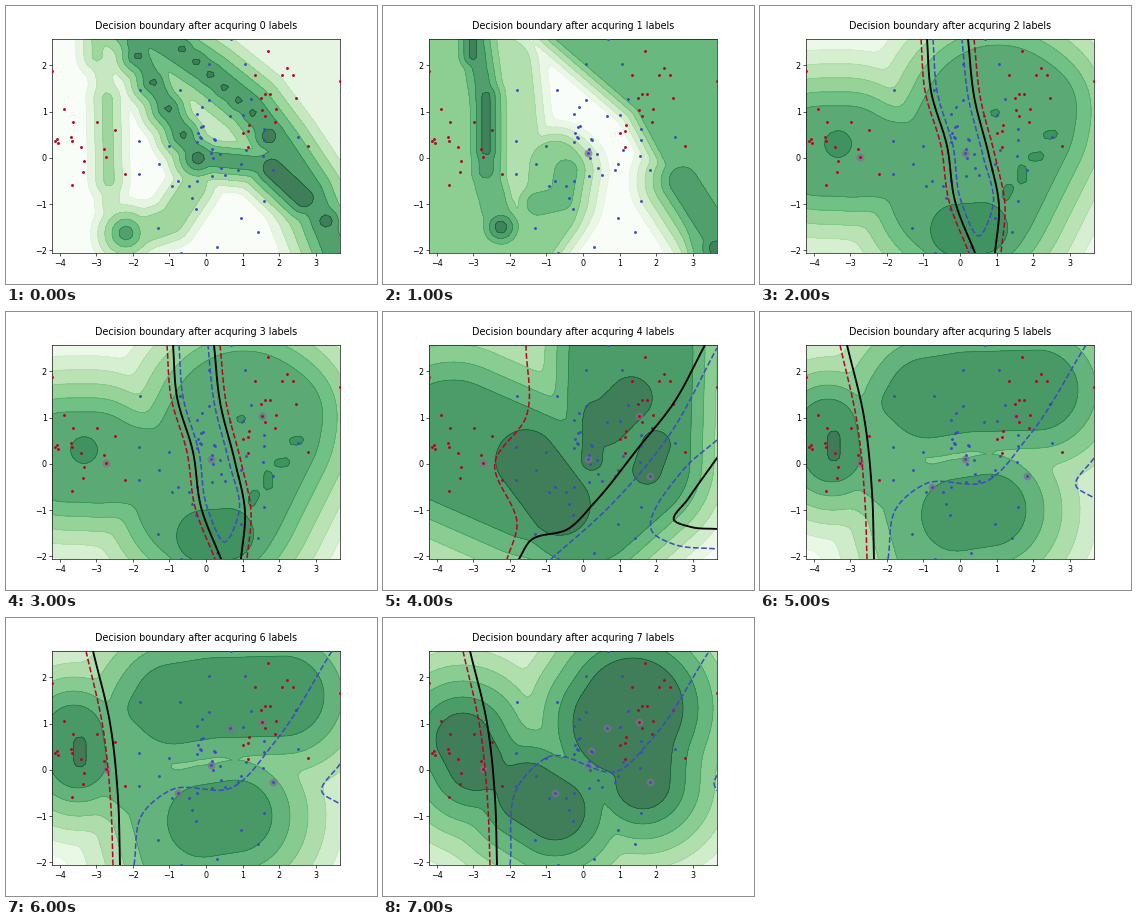
A matplotlib script for the animation above (8000 ms loop, 371 by 278 pixels).

```python
import numpy as np
import matplotlib.pyplot as plt
from matplotlib.animation import ArtistAnimation

W, H, DPI = 371, 278, 58
RED, BLUE, BLACK = "#b40426", "#3b4cc0", "black"
LEFT, RIGHT, TOP, BOTTOM = 46.375, 333.9, 33.36, 247.42
GREENS = plt.get_cmap("Greens")

fig, ax = plt.subplots(figsize=((W + .01) / DPI, (H + .01) / DPI), dpi=DPI)

# Plot coordinates are stage pixels; the ticks carry the data units.
ax.set(xlim=(LEFT, RIGHT), ylim=(BOTTOM, TOP))
ax.set_autoscale_on(False)
xs, ys = np.arange(-4, 4), np.arange(-2, 3)
ax.set_xticks(200.03 + 36.55 * xs, [f"{v}".replace("-", "\u2212") for v in xs])
ax.set_yticks(151.9 - 46.25 * ys, [f"{v}".replace("-", "\u2212") for v in ys])

X, Y = np.meshgrid(np.linspace(LEFT, RIGHT, 60), np.linspace(TOP, BOTTOM, 60))
scenes = [[] for _ in range(8)]


def distance(path):
    """Distance of every grid point to a path of straight pieces."""
    best = np.full(X.shape, np.inf)
    for (ax0, ay0), (bx, by) in zip(path, path[1:] or path):
        dx, dy = bx - ax0, by - ay0
        u = ((X - ax0) * dx + (Y - ay0) * dy) / max(dx * dx + dy * dy, 1e-9)
        u = np.clip(u, 0, 1)
        best = np.minimum(best, np.hypot(X - ax0 - u * dx, Y - ay0 - u * dy))
    return best


def hill(level, reach, fall, *path):
    """Plateau within `reach` of the path, losing one level per `fall` pixels."""
    return level + np.minimum(.4, (reach - distance(path)) / fall)


def terrain(steps, bands, peak, hills):
    """Merge hills smoothly and draw them as green contour bands."""
    z = np.log(sum(np.exp(4 * h) for h in hills)) / 4
    z = np.clip(z, .01, bands - .01)
    tones = GREENS(peak * np.linspace(0, 1, bands))[:, :3]
    fill = ax.contourf(X, Y, z, np.arange(bands + 1), colors=.75 * tones + .25, zorder=1)
    edge = ax.contour(X, Y, z, np.arange(1, bands), colors=tones[1:], linewidths=.7, zorder=1)
    for s in steps:
        scenes[s] += [fill, edge]


def curve(knots, n=16):
    """Cubic Hermite curve through the knots."""
    p = np.array(knots, float)
    t = np.r_[0, np.cumsum(np.hypot(*np.diff(p, axis=0).T))]
    m = np.gradient(p, t, axis=0)
    u = np.linspace(0, 1, n)[:, None]
    out = []
    for i, h in enumerate(np.diff(t)):
        out.append((1 + 2 * u) * (1 - u) ** 2 * p[i] + u * (1 - u) ** 2 * h * m[i]
                   + u * u * (3 - 2 * u) * p[i + 1] + u * u * (u - 1) * h * m[i + 1])
    return np.vstack(out).T


def line(steps, color, *knots):
    style, width = ("-", 2.3) if color == BLACK else ("--", 1.9)
    artist, = ax.plot(*curve(knots), style, color=color, lw=width, zorder=4)
    for s in steps:
        scenes[s].append(artist)


def row(a, b, n):
    return zip(np.linspace(a[0], b[0], n), np.linspace(a[1], b[1], n))


# No labels: a dark crescent with a chain of peaks on both arms
chains = [*row((132, 50), (177, 129), 4), *row((176, 43), (247, 107), 6)]
terrain([0], 7, .95, [
    hill(1, 110, 20, (310, 50)),
    hill(5, 11, 10, (120, 15), (160, 38), (205, 68), (245, 100), (275, 140), (305, 185), (328, 245)),
    hill(5, 7, 6, (128, 36), (150, 80), (176, 128), (192, 152), (255, 158), (285, 175)),
    hill(3, 5, 8, (101, 92), (103, 175)),
    hill(3, 5, 8, (91, 20), (91, 50)),
    hill(2, 8, 8, (91, 30), (103, 100), (105, 200), (118, 228)),
    hill(3, 12, 8, (115, 232), (165, 215), (188, 180)),
    hill(5, 7, 7, (120, 227)),
    hill(6, 9, 6, (266, 162), (298, 192)),
    hill(6, 7, 6, (263, 130)),
    hill(6, 6, 6, (192, 152)),
    hill(6, 6, 6, (320, 215)),
    *(hill(6, 3.5, 6, p) for p in chains)])

# One label: a pale wedge between two plateaus
terrain([1], 8, .93, [
    hill(5, 68, 5.5, (215, -20), (308, 60), (356, 150), (385, 260)),
    hill(4, 62, 10, (50, 0), (50, 280)),
    hill(3, 28, 8, (120, 60), (132, 180)),
    hill(4, 25, 7, (140, 245), (168, 205), (172, 160)),
    hill(5, 11, 8, (183, 165), (178, 193), (155, 198)),
    hill(5, 13, 6, (90, 20), (103, 110), (103, 170), (117, 222)),
    hill(6, 7, 6, (90, 20), (103, 100), (103, 165)),
    hill(6, 10, 6, (118, 221)),
    hill(7, 4, 5, (90, 20), (90, 50)),
    hill(7, 4, 5, (103, 90), (103, 145)),
    hill(7, 6, 5, (118, 221)),
    hill(6, 14, 8, (300, 175), (345, 245)),
    hill(7, 7, 6, (333, 242))])

# Two and three labels: a broad plateau cut by a narrow vertical band
early = [2, 3]
terrain(early, 8, .87, [
    hill(6, 45, 14, (60, 145), (88, 145)),
    hill(6, 38, 14, (100, 150), (160, 158)),
    hill(6, 76, 15, (238, 115), (205, 180)),
    hill(6, 40, 14, (275, 100), (225, 215)),
    hill(7, 25, 10, (196, 224), (222, 222)),
    hill(7, 13, 6, (78, 138)),
    hill(7, 4, 5, (235, 107)),
    hill(7, 4, 5, (288, 129), (293, 128)),
    hill(7, 4, 5, (273, 151), (280, 150)),
    hill(7, 4, 5, (262, 163), (262, 174)),
    hill(7, 4, 5, (249, 182), (246, 190))])
west = np.array([(167, 33), (171, 85), (187, 140), (195, 195), (215, 247)])
east = np.array([(208, 33), (214, 90), (229, 150), (239, 200), (235, 247)])
for color, gap in ((RED, 6), (BLACK, 0)):
    line(early, color, *(west - [gap, 0]))
    line(early, color, *(east + [gap, 0]))
line(early, BLUE, *(west[:-1] + [6, 0]), (219, 230), *(east[-2::-1] - [6, 0]))

# Four labels
terrain([4], 8, .95, [
    hill(6, 62, 18, (70, 130), (150, 165)),
    hill(6, 62, 12, (248, 40), (245, 150), (200, 190)),
    hill(7, 30, 10, (143, 148), (177, 193)),
    hill(7, 21, 8, (222, 112), (248, 86)),
    hill(7, 10, 8, (212, 100), (209, 148)),
    hill(7, 14, 8, (273, 133), (264, 158))])
line([4], RED, (143, 33), (143, 105), (112, 150), (134, 215), (124, 247))
line([4], BLUE, (168, 247), (225, 196), (285, 125), (334, 36))
line([4], BLUE, (334, 128), (300, 158), (271, 222), (290, 232), (334, 237))
line([4], BLACK, (136, 247), (147, 229), (185, 217), (212, 190), (256, 135), (290, 92), (322, 33))
line([4], BLACK, (334, 146), (305, 187), (291, 208), (308, 215), (334, 217))

# Five and six labels
late = [5, 6]
terrain(late, 8, .97, [
    hill(6, 28, 14, (68, 115), (72, 142)),
    hill(7, 6, 7, (74, 125), (74, 143)),
    hill(6, 40, 18, (168, 86), (205, 80), (278, 78)),
    hill(6, 12, 18, (135, 91), (165, 86)),
    hill(6, 36, 18, (198, 203), (230, 198)),
    hill(5, 30, 18, (105, 140), (150, 180), (165, 235))])
line(late, BLUE, (128, 247), (137, 195), (165, 172), (225, 170), (268, 125), (326, 33))
line(late, BLUE, (334, 146), (316, 174), (334, 186))

# Seven labels
terrain([7], 8, .95, [
    hill(7, 27, 16, (80, 122), (92, 145)),
    hill(7, 10, 16, (100, 155), (130, 163)),
    hill(7, 30, 16, (145, 175), (172, 192)),
    hill(7, 50, 15, (250, 90), (240, 105)),
    hill(7, 27, 15, (262, 120), (260, 164))])
line([7], BLUE, (127, 247), (137, 165), (165, 139), (235, 153), (268, 122), (325, 35))
line([7], BLUE, (334, 157), (331, 165), (334, 173))

line([5, 6, 7], RED, (80, 33), (97, 110), (105, 190), (107, 247))
line([5, 6, 7], BLACK, (87, 33), (104, 105), (112, 180), (114, 247))

# Samples: a few key points per class, the rest scattered around cluster centres
rng = np.random.default_rng(4)


def cluster(n, centre, spread):
    return np.clip(rng.normal(size=(n, 2)), -1.8, 1.8) * spread + centre


queries = np.array([(205, 147), (100, 151), (256, 104), (267, 164),
                    (172, 175), (224, 110), (208, 133)])
reds = np.vstack([
    [(46, 65), (58, 103), (67, 116), (91, 116), (49, 135), (75, 141), (109, 124), (77, 166),
     (66, 179), (119, 168), (262, 45), (281, 62), (249, 69), (334, 75), (290, 92),
     (243, 119), (302, 140)],
    queries[1:3], cluster(6, (74, 133), (14, 14)), cluster(11, (264, 105), (15, 20))])
blues = np.vstack([
    [(225, 33), (239, 58), (203, 58), (134, 84), (245, 93), (292, 131), (133, 135), (163, 140),
     (153, 158), (133, 168), (152, 222), (190, 203), (166, 180), (235, 212), (252, 226),
     (211, 241), (175, 247), (258, 195), (257, 150), (203, 94), (191, 108)],
    queries[[0, 3, 4, 5, 6]], cluster(24, (214, 138), (24, 30))])
for points, color in ((reds, RED), (blues, BLUE)):
    ax.scatter(*(points.T + .4), s=13, color=color, lw=0, zorder=3)

for n, scene in enumerate(scenes):
    scene.append(ax.scatter(*(queries[:n].T + .4), s=95, color="#80708c", alpha=.7, lw=0, zorder=2))
    scene.append(ax.text(190.1, 23, f"Decision boundary after acquring {n} labels",
                         size=12, ha="center", va="baseline"))

anim = ArtistAnimation(fig, scenes, interval=1000, repeat=True, repeat_delay=0, blit=False)
plt.show()
```
